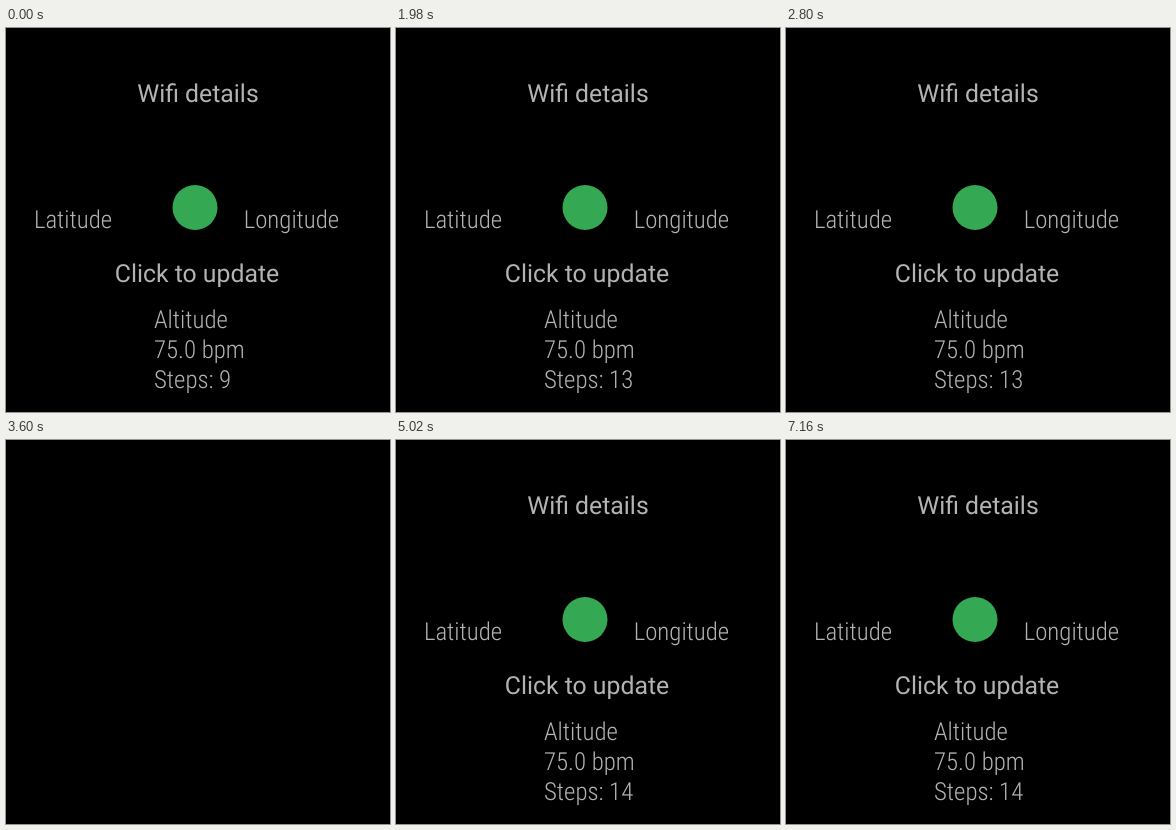
Recreate the animation shown at these times as an HTML page. Size 384x384 px, loop 8 s.

```html
<!DOCTYPE html>
<html lang="en">
<head>
<meta charset="utf-8">
<title>Watch sensors</title>
<style>
  html, body { margin: 0; width: 100%; height: 100%; overflow: hidden; background: #000; }
  svg { display: block; width: 100%; height: 100%; }
  text { font: 400 24.8px Roboto, sans-serif; fill: #b3b3b3; white-space: pre; text-rendering: geometricPrecision; }
  .thin text { font-family: "Roboto Condensed", Roboto, sans-serif; font-weight: 300; font-stretch: 75%; }
</style>
</head>
<body>
<svg viewBox="0 0 384 384">
  <g id="screen">
    <text x="131.2" y="74.3">Wifi details</text>
    <text x="108.8" y="254.2">Click to update</text>
    <circle cx="189" cy="179.5" r="22.5" fill="#34a853"/>
    <g class="thin">
      <text x="27.9" y="200.3">Latitude</text>
      <text x="237.7" y="200.3">Longitude</text>
      <text x="148" y="300.3">Altitude</text>
      <text x="148" y="330.3">75.0 bpm</text>
      <text x="148" y="360.3" id="steps">Steps: 9</text>
    </g>
  </g>
</svg>
<script>
  const LOOP = 8000;
  const BLINK = 100;
  const blinks = [2700, 3600];
  const counts = [[0, 9], [900, 13], [3700, 14]];
  const screenGroup = document.getElementById("screen");
  const steps = document.getElementById("steps");

  function draw(t) {
    const dark = blinks.some(b => t >= b && t < b + BLINK);
    const count = counts.filter(([start]) => t >= start).pop()[1];
    screenGroup.style.visibility = dark ? "hidden" : "visible";
    const label = `Steps: ${count}`;
    if (steps.textContent !== label) steps.textContent = label;
  }

  function tick() {
    draw(performance.now() % LOOP);
    requestAnimationFrame(tick);
  }

  draw(0);
  requestAnimationFrame(tick);
</script>
</body>
</html>
```
